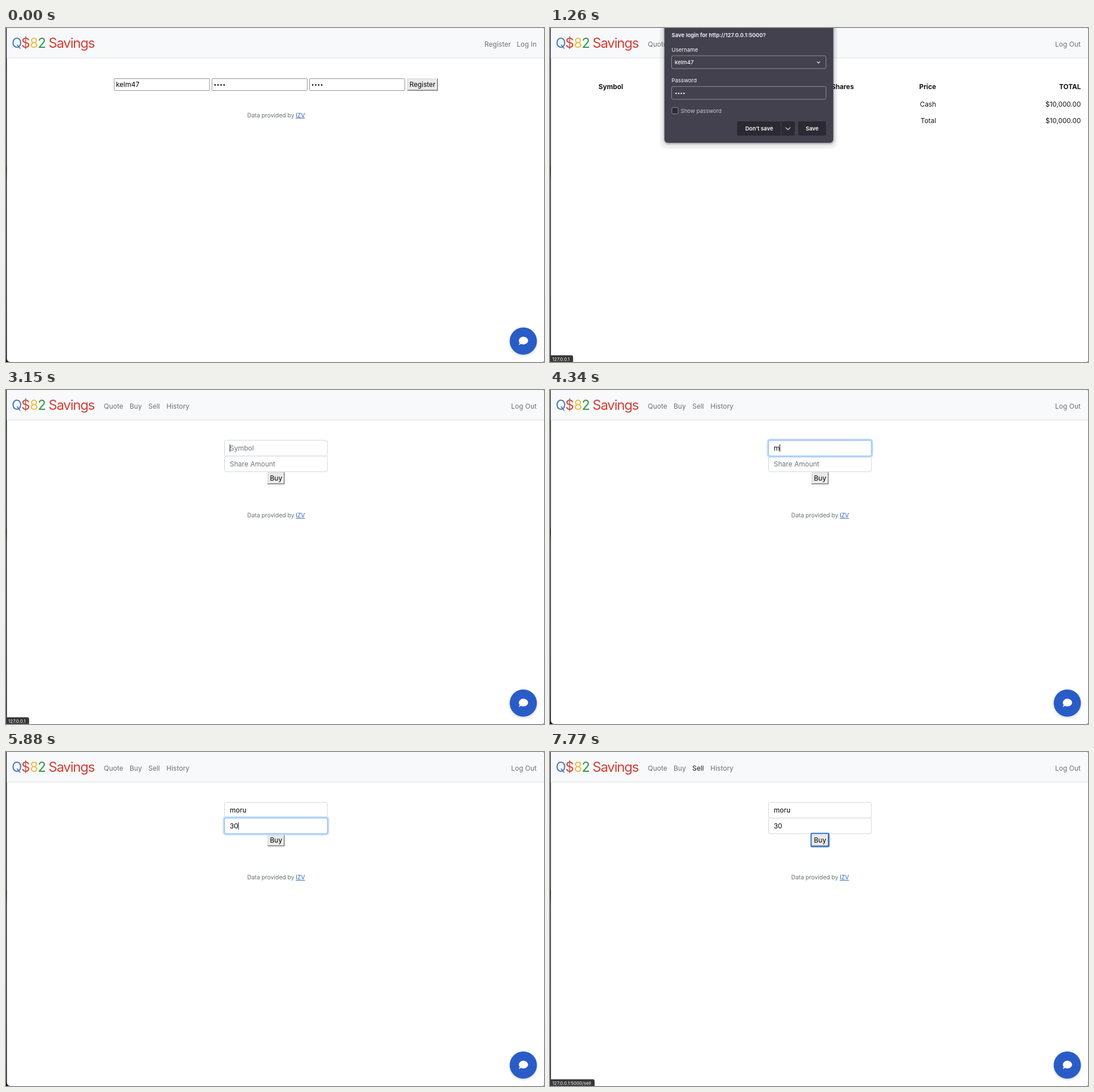
Recreate the animation shown at these times as an HTML page. Size 949x590 px, loop 8 s.

```html
<!DOCTYPE html>
<html lang="en">
<head>
<meta charset="utf-8">
<title>Stock trading demo</title>
<style>
html, body { margin: 0; width: 100%; height: 100%; overflow: hidden; background: #fff; }
svg { display: block; width: 949px; height: 590px; font: 12px Inter, sans-serif; }
.logo { font-size: 24px; letter-spacing: -1.2px; }
.nav { fill: #6f7071; }
.end { text-anchor: end; }
.mid { text-anchor: middle; }
.table { fill: #141619; font-size: 11.8px; }
.table .head { font-weight: 700; }
.foot { font-size: 10.3px; fill: #6a6d70; }
.foot .link { fill: #2b63b5; text-decoration: underline; }
.old { fill: #fff; stroke: #929292; }
.field { fill: #fff; stroke: #d2d5d8; }
.ring { fill: none; stroke: #c2dbfe; stroke-width: 3; }
.edge { fill: none; stroke: #86b7fe; }
.hint { fill: #6c757d; }
.popup { font-size: 9.6px; fill: #fbfbfe; }
.popup .bold { font-weight: 600; }
.popup .box { fill: #42414d; stroke: #8f8f9d; }
.popup .btn { fill: #2b2a33; }
.popup .line { fill: none; stroke: #fbfbfe; stroke-width: 1.1; }
.status { font-size: 8px; fill: #fff; }
</style>
</head>
<body>
<svg viewBox="0 0 949 590">
  <defs>
    <linearGradient id="desk" x2="0" y2="1">
      <stop offset="0" stop-color="#1b1d35"/>
      <stop offset=".41" stop-color="#23253c"/>
      <stop offset=".42" stop-color="#08080f"/>
      <stop offset=".46" stop-color="#2a2c40"/>
      <stop offset=".76" stop-color="#22243a"/>
      <stop offset="1" stop-color="#0c0d1c"/>
    </linearGradient>
    <clipPath id="page"><path d="M1.5 0H947q2 0 2 2V588q0 2-2 2H8q-6.5 0-6.5-6.5z"/></clipPath>
    <filter id="soft" x="-20%" y="-20%" width="140%" height="140%"><feGaussianBlur stdDeviation="2"/></filter>
  </defs>
  <rect width="949" height="590" fill="url(#desk)"/>
  <g clip-path="url(#page)">
    <rect width="949" height="590" fill="#fff"/>
    <rect width="949" height="53" fill="#f8f9fa"/>
    <path d="M0 53H949" stroke="#dfe1e4"/>
  </g>

  <text class="logo" y="35"><tspan x="10" fill="#4f7fb0">Q</tspan><tspan x="27" fill="#d3453b">$</tspan><tspan x="42" fill="#eebd45">8</tspan><tspan x="56" fill="#2e944b">2</tspan><tspan x="75" fill="#cf3f38">Savings</tspan></text>

  <g id="guest">
    <text class="nav" x="844" y="33">Register</text>
    <text class="nav end" x="936" y="33">Log In</text>
    <rect class="old" x="191" y="89.5" width="168" height="21" rx="1"/>
    <rect class="old" x="363.3" y="89.5" width="168" height="21" rx="1"/>
    <rect class="old" x="535.5" y="89.5" width="168" height="21" rx="1"/>
    <text x="194" y="104">kelm47</text>
    <g class="dots" data-x="368.8" data-y="100.6" data-gap="5.3"></g>
    <g class="dots" data-x="541" data-y="100.6" data-gap="5.3"></g>
    <rect id="regFill" x="708" y="89.5" width="53.5" height="21"/>
    <path id="regLight" d="M708 110V89.8H761" fill="none"/>
    <path id="regDark" d="M708 110H761.3V89.5" fill="none" stroke-width="1.4"/>
    <text class="mid" x="734.6" y="104" font-size="11.8">Register</text>
  </g>

  <g id="member" class="nav">
    <text x="172.5" y="33">Quote</text>
    <text id="navBuy" x="218" y="33">Buy</text>
    <text id="navSell" x="251" y="33">Sell</text>
    <text id="navHistory" x="283" y="33">History</text>
    <text class="end" x="936" y="33">Log Out</text>
  </g>

  <g id="folio" class="table">
    <g class="head">
      <text class="end" x="129" y="108">Symbol</text>
      <text x="209" y="108">Name</text>
      <text class="end" x="536" y="108">Shares</text>
      <text class="end" x="681" y="108">Price</text>
      <text class="end" x="936.5" y="108">TOTAL</text>
    </g>
    <text class="end" x="681" y="139">Cash</text>
    <text class="end" x="936.5" y="139">$10,000.00</text>
    <text class="end" x="681" y="168">Total</text>
    <text class="end" x="936.5" y="168">$10,000.00</text>
  </g>

  <g id="trade">
    <rect class="field" x="385.5" y="89" width="181.5" height="27.5" rx="3"/>
    <rect class="field" x="385.5" y="116.7" width="181.5" height="27.5" rx="3"/>
    <rect x="461.5" y="145.3" width="29.5" height="20.7" fill="#e9e9ea"/>
    <path d="M461.8 166V145.3H491" fill="none" stroke="#d8d8da"/>
    <path d="M461.5 165.7H490.7V145.5" fill="none" stroke="#77777a" stroke-width="1.4"/>
    <rect id="buyRing" x="460.5" y="143.7" width="31.6" height="23.6" rx="1.8" fill="none" stroke="#2068cc" stroke-width="1.8"/>
    <text class="mid" x="476.3" y="160">Buy</text>
    <g id="ring0"><rect class="ring" x="384" y="87.5" width="184.5" height="30.5" rx="4"/><rect class="edge" x="385.5" y="89" width="181.5" height="27.5" rx="3"/></g>
    <g id="ring1"><rect class="ring" x="384" y="115.2" width="184.5" height="30.5" rx="4"/><rect class="edge" x="385.5" y="116.7" width="181.5" height="27.5" rx="3"/></g>
    <text id="symbol" x="394.7" y="107"></text>
    <text id="amount" x="394.7" y="135"></text>
    <rect id="caret" width="1" height="13" fill="#111"/>
  </g>

  <g id="foot" class="foot">
    <text x="425.5" y="0">Data provided by</text>
    <text class="link" x="511" y="0">IZV</text>
  </g>

  <g id="chat">
    <circle cx="912.5" cy="554.5" r="24" fill="#000" opacity=".2" filter="url(#soft)"/>
    <circle cx="912.5" cy="553" r="24" fill="#2a5cc8"/>
    <path d="M904.5 552.2a8.2 6.8 0 1 1 4.2 5.9q-2 1.6-4.6 1.9 1.7-1.7 1.9-3.7-1.5-1.800-1.500-4.100z" fill="#fff"/>
  </g>

  <g id="status" class="status">
    <path id="statusBox" fill="#363638" stroke="#5a5a5c" stroke-width=".6"/>
    <text id="statusText" x="4" y="588"></text>
  </g>

  <g id="popup" class="popup">
    <rect x="194" y="-20" width="313" height="233" rx="12" fill="#3c3c46" opacity=".07"/>
    <rect x="201" y="-20" width="300" height="225" rx="7" opacity=".3" fill="#000" filter="url(#soft)"/>
    <rect x="202" y="-10" width="297.500" height="212.700" rx="6" fill="#42414d" stroke="#52525e" stroke-width=".6"/>
    <text class="bold" x="214.500" y="15.500">Save login for http://127.0.0.1:5000?</text>
    <text x="214.500" y="42">Username</text>
    <rect class="box" x="214.500" y="49" width="272.300" height="22.700" rx="2.500"/>
    <text x="220" y="64" font-weight="500">kelm47</text>
    <path class="line" d="M471 59.300l2.700 2.700 2.700-2.700"/>
    <text x="214.500" y="96">Password</text>
    <rect class="box" x="214.500" y="103.300" width="272.300" height="22.700" rx="2.500"/>
    <g class="dots" data-x="222.300" data-y="115.500" data-gap="4.700"></g>
    <rect id="check" x="215" y="140.500" width="11" height="11" rx="1.500" stroke="#8f8f9d"/>
    <text x="230.500" y="150" fill="#c9c8d0">Show password</text>
    <rect class="btn" x="330" y="165" width="102" height="25" rx="3"/>
    <path id="dont" d="M407.500 165V190H333q-3 0-3-3V168q0-3 3-3z"/>
    <path d="M407.500 165V190" stroke="#42414d"/>
    <path class="line" d="M415.500 175.600l4.200 4.200 4.200-4.200"/>
    <rect class="btn" x="437.500" y="165" width="49.500" height="25" rx="3"/>
    <text class="bold mid" x="369" y="181">Don't save</text>
    <text class="bold mid" x="462.300" y="181">Save</text>
  </g>
</svg>
<script>
const LOOP = 8000;
const $ = id => document.getElementById(id);
const set = (id, name, value) => $(id).setAttribute(name, value);
const fade = (id, v) => set(id, 'opacity', +v);
const ramp = (t, start, ms = 140) => Math.min(1, Math.max(0, (t - start) / ms));
const within = (t, a, b) => t >= a && t < b;
const pulse = (t, on, off) => ramp(t, on) - ramp(t, off);
const typed = (t, word, times) => word.slice(0, times.filter(at => t >= at).length);

for (const g of document.querySelectorAll('.dots')) {
  const { x, y, gap } = g.dataset;
  for (let i = 0; i < 4; i++) {
    const dot = document.createElementNS('http://www.w3.org/2000/svg', 'circle');
    dot.setAttribute('cx', +x + i * gap);
    dot.setAttribute('cy', y);
    dot.setAttribute('r', 1.35);
    g.append(dot);
  }
}

function tint(id, v) {
  const mix = (a, b) => Math.round(a + (b - a) * v);
  set(id, 'fill', `rgb(${mix(111, 28)},${mix(112, 28)},${mix(113, 30)})`);
}

function fill(id, text, hint) {
  $(id).textContent = text || hint;
  $(id).setAttribute('class', text ? '' : 'hint');
}

function drawButton(t) {
  const down = within(t, 840, 980);
  set('regFill', 'fill', down ? '#c4c4c8' : t >= 700 ? '#d9d9dc' : '#e9e9ea');
  set('regLight', 'stroke', down ? '#77777a' : '#d8d8da');
  set('regDark', 'stroke', down ? '#d8d8da' : '#77777a');
}

function drawStatus(t) {
  const path = t >= 7630 ? ':5000/sell' : t >= 7210 ? ':5000/history' : '';
  const w = t >= 7630 ? 78.5 : t >= 7210 ? 92 : 40.5;
  fade('status', within(t, 980, 1400) || within(t, 2870, 3290) || t >= 6370);
  $('statusText').textContent = '127.0.0.1' + path;
  set('statusBox', 'd', `M0 578.3H${w - 3}q3 0 3 3V590H0z`);
}

function drawTrade(t) {
  const symbol = typed(t, 'moru', [4340, 4480, 4620, 4760]);
  const amount = typed(t, '30', [5740, 5880]);
  fill('symbol', symbol, 'Symbol');
  fill('amount', amount, 'Share Amount');
  fade('ring0', pulse(t, 3150, 5030));
  fade('ring1', pulse(t, 5030, 5950));
  fade('buyRing', t >= 5950);

  const second = t >= 5030;
  const text = second ? amount : symbol;
  const width = text ? $(second ? 'amount' : 'symbol').getComputedTextLength() : 0;
  set('caret', 'x', 394.5 + width);
  set('caret', 'y', second ? 124 : 96);
  fade('caret', t < 5950 && !within(t, 3710, 4340) && !within(t, 5600, 5740));
}

function draw(t) {
  const guest = t < 1190, trade = t >= 3080;
  const loading = within(t, 1190, 1330) || within(t, 3080, 3150);
  fade('guest', guest);
  fade('member', !guest);
  fade('folio', !guest && !trade);
  fade('trade', trade);
  fade('foot', !loading);
  set('foot', 'transform', `translate(0 ${guest ? 157.7 : trade ? 225.3 : 237})`);
  fade('chat', !loading);

  fade('popup', t < 2100 ? ramp(t, 945, 100) : 0);
  set('check', 'fill', within(t, 1540, 1610) ? '#52525e' : '#2b2a33');
  set('dont', 'fill', t >= 1820 ? '#52525e' : '#2b2a33');

  tint('navBuy', trade ? 0 : ramp(t, 2590));
  tint('navSell', pulse(t, 2310, 2590) + ramp(t, 7630));
  tint('navHistory', pulse(t, 7210, 7630));

  drawButton(t);
  drawStatus(t);
  drawTrade(t);
}

function tick() {
  draw(performance.now() % LOOP);
  requestAnimationFrame(tick);
}
tick();
</script>
</body>
</html>
```
